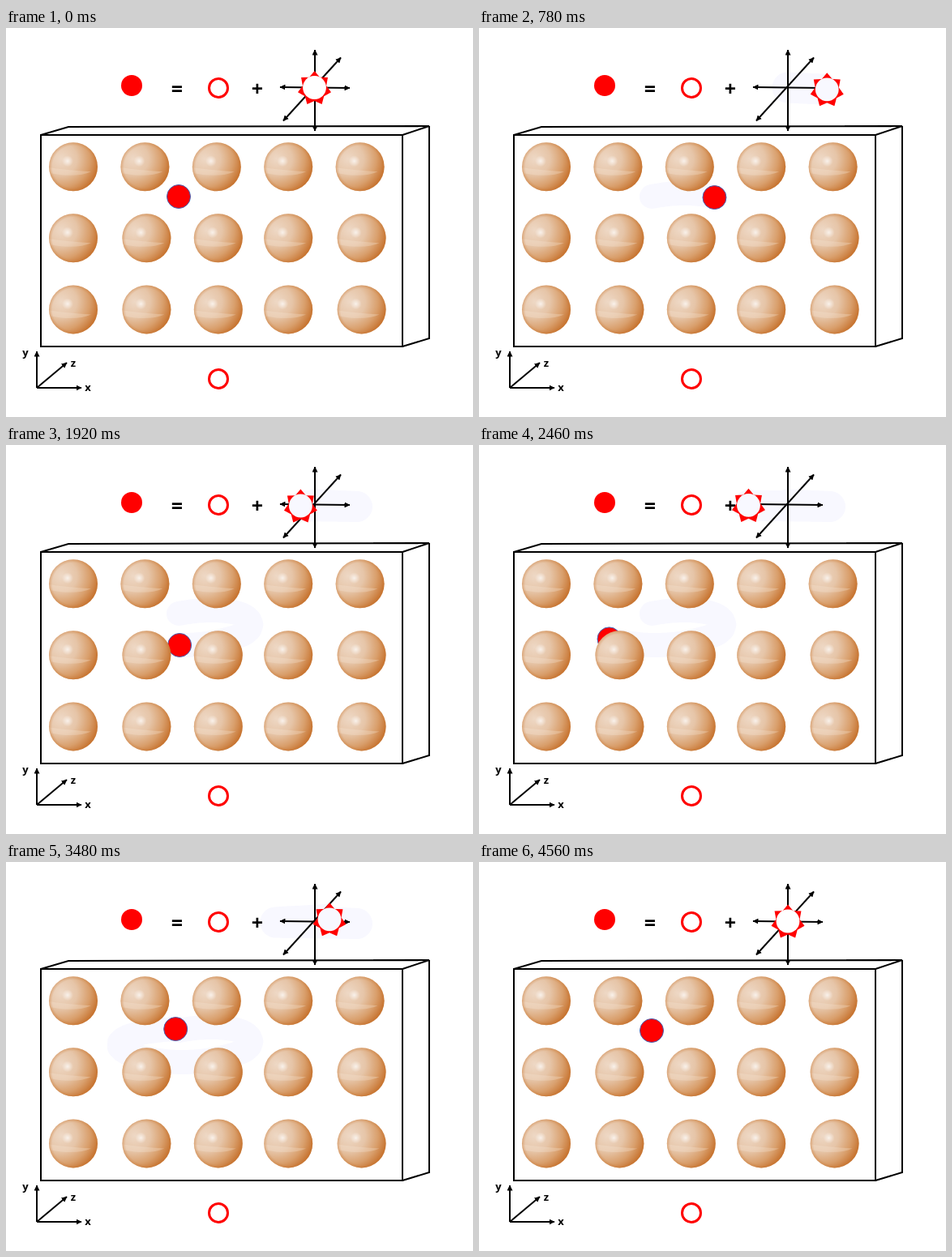
These frames come from a looping animation (576 by 480 pixels, 4620 ms). An HTML page:

```html
<!DOCTYPE html>
<html lang="en">
<head>
<meta charset="utf-8">
<title>Particle in a lattice</title>
<style>
  html, body { margin: 0; width: 100%; height: 100%; overflow: hidden; background: #fff; }
  svg { display: block; width: 100vw; height: 100vh; }
  text { font-family: "Open Sans", "Noto Sans", sans-serif; font-weight: 700; text-anchor: middle; }
  .line { fill: none; stroke: #000; stroke-width: 2; }
  .tip { marker-end: url(#arrow); }
  .tips { marker-start: url(#arrow); marker-end: url(#arrow); }
  .ring { fill: #fff; stroke: #f00; stroke-width: 3; }
  .trail { fill: none; stroke: #f8f8ff; stroke-linecap: round; stroke-linejoin: round; }
</style>
</head>
<body>
<svg viewBox="0 0 576 480">
  <defs>
    <marker id="arrow" viewBox="0 0 7 7" refX="6.5" refY="3.5" markerWidth="7" markerHeight="7"
            markerUnits="userSpaceOnUse" orient="auto-start-reverse">
      <path d="M0 0L7 3.5L0 7Z"/>
    </marker>
    <radialGradient id="skin" cx=".26" cy=".34" r=".8">
      <stop offset="0" stop-color="#eed8c5"/>
      <stop offset=".4" stop-color="#e6c5a8"/>
      <stop offset=".72" stop-color="#d99f6c"/>
      <stop offset="1" stop-color="#c56f2a"/>
    </radialGradient>
    <radialGradient id="rim">
      <stop offset=".86" stop-color="#c8752f" stop-opacity="0"/>
      <stop offset="1" stop-color="#c8752f" stop-opacity=".4"/>
    </radialGradient>
    <radialGradient id="shine">
      <stop offset="0" stop-color="#fff" stop-opacity=".7"/>
      <stop offset=".5" stop-color="#fff" stop-opacity=".35"/>
      <stop offset="1" stop-color="#fff" stop-opacity="0"/>
    </radialGradient>
    <g id="sphere">
      <circle r="30" fill="url(#skin)"/>
      <path d="M-29 1Q-10 4 22 6Q4 14 -28 8Z" fill="#f6e4d4" opacity=".3"/>
      <circle r="30" fill="url(#rim)"/>
      <circle cx="-7" cy="-7" r="7" fill="url(#shine)"/>
    </g>
    <path id="route" d="M213 208Q249 201 280 206C306 211 311 228 286 236Q252 247 218 247
      Q190 247 163 240C130 232 128 216 178 209Q205 205 235 206C275 208 270 220 237 215Z"/>
  </defs>

  <path id="ballTrail" class="trail" stroke-width="30"/>
  <path id="sunTrail" class="trail" stroke-width="38"/>

  <circle cx="155" cy="71" r="13" fill="#f00"/>
  <text x="211" y="83.5" font-size="25">=</text>
  <circle class="ring" cx="262" cy="74" r="11.5"/>
  <text x="310" y="83.5" font-size="25">+</text>
  <path class="line tips" d="M381 27V127"/>
  <path class="line tips" d="M338 73L424 74"/>
  <path class="line tips" d="M342 114.5L413 36.5"/>

  <path class="line" d="M43 132H489V393H43ZL77 122L522 121L489 132M522 121V383L489 393"/>

  <circle id="ball" r="14.5" fill="#f00" stroke="#3f62b5"/>
  <g id="spheres"></g>

  <circle class="ring" cx="262" cy="433" r="11.5"/>
  <path class="line tip" d="M38 444V399"/>
  <path class="line tip" d="M38 444H93"/>
  <path class="line tip" d="M38 444L75 413"/>
  <g font-size="13">
    <text x="24" y="404.5">y</text>
    <text x="101" y="448">x</text>
    <text x="83" y="418">z</text>
  </g>

  <g id="sun">
    <path id="rays" fill="#f00"/>
    <circle id="disc" r="14.4"/>
  </g>
</svg>
<script>
const STEP = 60, LAST = 76;
const $ = id => document.getElementById(id);
const range = n => [...Array(n).keys()];

// The ball runs round its loop at constant speed.
const route = $('route'), loop = route.getTotalLength();
function ballAt(step) {
  const { x, y } = route.getPointAtLength(loop * step / LAST);
  return [x, y];
}

// The sun swings between turning points: [step, x, y]
const turns = [[0, 380.5, 73.5], [14, 433, 76], [40.5, 330.5, 74.5], [64, 422.5, 69.5], [LAST, 381, 73]];
function sunAt(step) {
  const i = turns.findIndex(turn => turn[0] >= step) || 1;
  const [t0, x0, y0] = turns[i - 1], [t1, x1, y1] = turns[i];
  const u = (step - t0) / (t1 - t0);
  return [x0 + (x1 - x0) * u, y0 + (y1 - y0) * u];
}

const ballPath = range(LAST + 1).map(ballAt);
const sunPath = range(LAST + 1).map(sunAt);

// Seven-pointed star stretched to a square box
function starPoint(k) {
  const r = k % 2 ? 14.6 : 20.5, a = k * Math.PI / 7 - Math.PI / 2;
  return [r * Math.cos(a) / .975, (r * Math.sin(a) + 1) / .95];
}
$('rays').setAttribute('d', 'M' + range(14).map(starPoint).join('L') + 'Z');

$('spheres').innerHTML = range(15).map(i => {
  const col = i % 5, row = Math.floor(i / 5);
  const shift = row && col % 3 ? 2 : 0;
  return `<use href="#sphere" x="${83 + 88.4 * col + shift}" y="${171.2 + 88.1 * row}"/>`;
}).join('');

const place = (id, p) => $(id).setAttribute('transform', `translate(${p})`);
const trace = (id, path, n) => $(id).setAttribute('d', n ? `M${path[0]}L${path.slice(0, n).join('L')}` : '');

function draw(time) {
  const n = Math.floor(time / STEP) % (LAST + 1);
  const marked = n % LAST;
  place('ball', ballPath[n]);
  place('sun', sunPath[n]);
  trace('ballTrail', ballPath, marked);
  trace('sunTrail', sunPath, marked);
  $('disc').setAttribute('fill', marked ? '#f8f8ff' : '#fff');
}

const start = performance.now();
function tick() {
  draw(performance.now() - start);
  requestAnimationFrame(tick);
}
tick();
</script>
</body>
</html>
```
